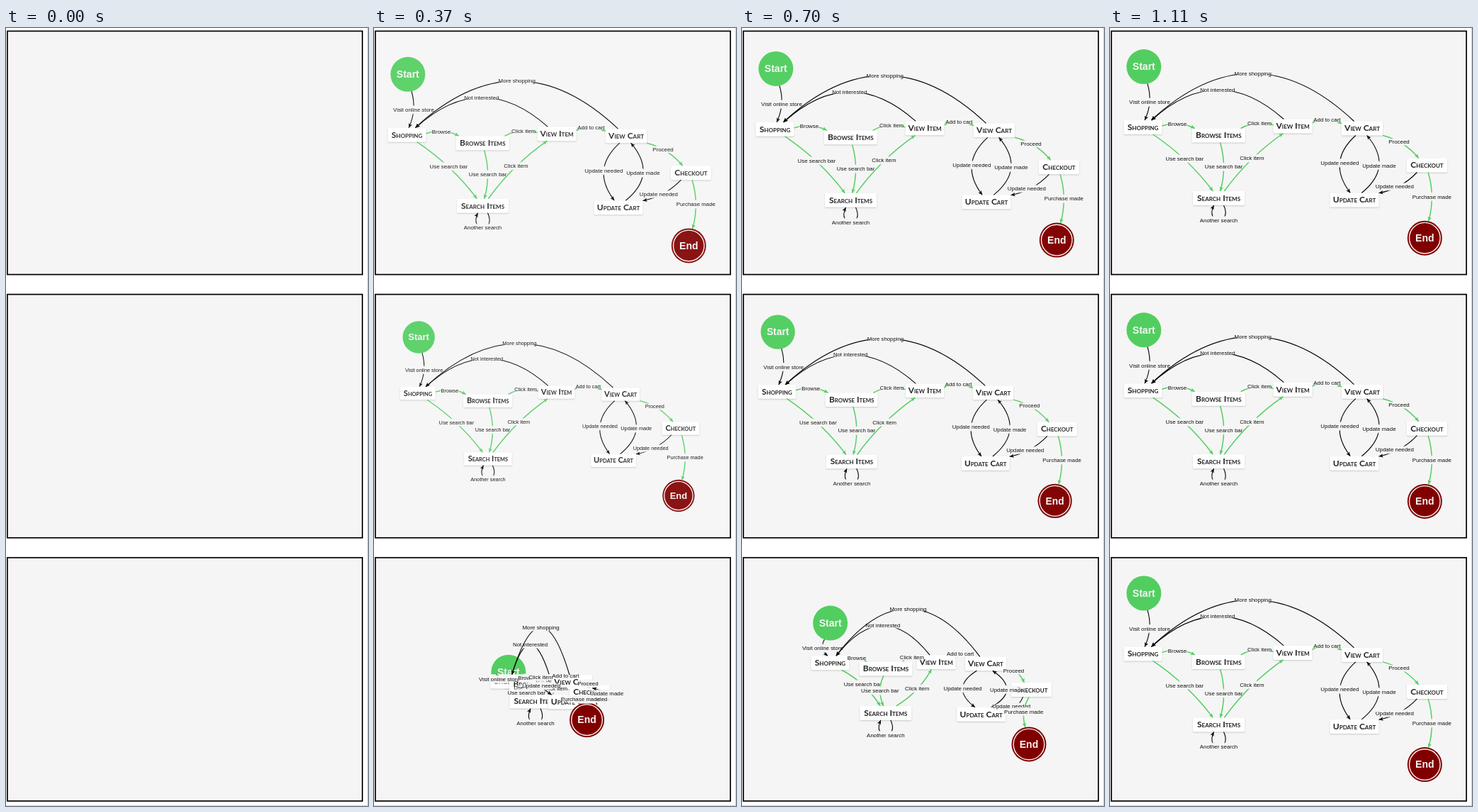
Animation of 511 by 1097 pixels, one loop 2.07 s. Source, as an HTML page with a canvas:

```html
<!DOCTYPE html>
<html lang="en">
<head>
<meta charset="utf-8">
<title>Flow chart entrances</title>
<style>
  html, body { margin: 0; width: 100%; height: 100%; overflow: hidden; background: #fff; }
  canvas { display: block; width: 511px; height: 1097px; }
</style>
</head>
<body>
<canvas id="stage"></canvas>
<script>
const W = 511, H = 1097, LOOP = 2070, START = 70;
const GREEN = '#52ce60', MAROON = '#800000', BACK = '#f5f5f5', INK = '#000';
const SANS = '"Liberation Sans", Arial, sans-serif';
const CAPS = 'small-caps bold 12px Lato, sans-serif';
const R = 24.5, STEP = 371.2, SETTLE = 1.1;

const canvas = document.getElementById('stage');
const ctx = canvas.getContext('2d');
const dpr = window.devicePixelRatio || 1;
canvas.width = W * dpr;
canvas.height = H * dpr;

// name: [text, centre x, centre y, half width, half height]
const nodes = {
  start: ['Start', 47.8, 54.6, R, R],
  shop: ['Shopping', 46.5, 140, 27, 10],
  browse: ['Browse Items', 153.3, 151.5, 37.5, 10],
  search: ['Search Items', 153.5, 240, 36.5, 10],
  item: ['View Item', 258, 138.5, 27.5, 10],
  cart: ['View Cart', 356, 141.5, 29, 10],
  update: ['Update Cart', 345, 242.5, 34.5, 10],
  check: ['Checkout', 447.5, 193.5, 28.5, 10],
  end: ['End', 444.3, 296.2, R, R]
};

// from, to, text, colour, bend, label shift x, y, bend factor while unfolding
const links = [
  ['start', 'shop', 'Visit online store', INK, 6.6, 0, 0, -1],
  ['shop', 'browse', 'Browse', GREEN, 6.6, -2, 1],
  ['shop', 'search', 'Use search bar', GREEN, 6.6, -1, -2],
  ['browse', 'search', 'Use search bar', GREEN, 6.6, 0, 0, -1],
  ['search', 'item', 'Click item', GREEN, 6.6, 1, -2, -1],
  ['search', 'search', 'Another search', INK, 0],
  ['browse', 'item', 'Click item', GREEN, 6.6, 4, 0],
  ['item', 'shop', 'Not interested', INK, -56],
  ['item', 'cart', 'Add to cart', GREEN, 6.6],
  ['cart', 'shop', 'More shopping', INK, -89],
  ['cart', 'update', 'Update needed', INK, -25],
  ['update', 'cart', 'Update made', INK, -28],
  ['cart', 'check', 'Proceed', GREEN, 6.6, -5, -3],
  ['check', 'update', 'Update needed', INK, 6.6, -7, 1],
  ['check', 'end', 'Purchase made', GREEN, 6.6, 0, 0, -1]
];

// elapsed ms -> animation progress
const clock = [[70, .035], [250, .236], [370, .373], [630, .543], [800, .721], [930, .839], [1110, 1]];
// progress -> place of the start circle while the chart unfolds and recentres
const anchor = [[0, 245, 206], [.236, 228, 194], [.373, 190, 166], [.543, 148, 113],
                [.721, 92, 74], [.839, 70, 62], [1, 59, 56]];

function lookup(table, x, col = 1) {
  if (x <= table[0][0]) return table[0][col];
  for (let i = 1; i < table.length; i++) {
    const a = table[i - 1], b = table[i];
    if (x <= b[0]) return a[col] + (b[col] - a[col]) * (x - a[0]) / (b[0] - a[0]);
  }
  return table[table.length - 1][col];
}

const outExpo = t => t >= 1 ? 1 : 1 - 2 ** (-10 * t);
const inOutQuad = t => t < .5 ? 2 * t * t : 1 - 2 * (1 - t) ** 2;

function restLayout() {
  const out = {};
  for (const id in nodes) {
    const [text, x, y, hw, hh] = nodes[id];
    out[id] = { text, x, y, hw, hh };
  }
  return out;
}

// All top left corners begin on one point and spread apart.
function unfoldLayout(t) {
  const p = inOutQuad(t), out = restLayout(), s = nodes.start;
  const ax = lookup(anchor, t, 1) - R, ay = lookup(anchor, t, 2) - R;
  for (const n of Object.values(out)) {
    n.x = ax + n.hw + p * (n.x - n.hw - s[1] + R);
    n.y = ay + n.hh + p * (n.y - n.hh - s[2] + R);
  }
  return out;
}

function disc(x, y, r) {
  ctx.beginPath();
  ctx.arc(x, y, r, 0, 7);
}

function drawRound(n, fill, ring) {
  ctx.fillStyle = fill;
  disc(n.x, n.y, R);
  ctx.fill();
  if (ring) {
    ctx.strokeStyle = BACK;
    ctx.lineWidth = 1.4;
    disc(n.x, n.y, 21.8);
    ctx.stroke();
  }
  ctx.fillStyle = BACK;
  ctx.font = `bold 14px ${SANS}`;
  ctx.textAlign = 'center';
  ctx.fillText(n.text, n.x, n.y + 4.8);
}

function drawBox(n) {
  ctx.save();
  ctx.shadowColor = '#c8c8c8';
  ctx.shadowBlur = 2 * dpr;
  ctx.shadowOffsetY = dpr;
  ctx.fillStyle = '#fff';
  ctx.beginPath();
  ctx.roundRect(n.x - n.hw, n.y - n.hh, n.hw * 2, n.hh * 2, 1.3);
  ctx.fill();
  ctx.restore();
  ctx.fillStyle = 'rgba(0,0,0,.87)';
  ctx.font = CAPS;
  ctx.textAlign = 'center';
  ctx.fillText(n.text, n.x, n.y + 3.8);
}

// Point on a node's outline in the direction of (x, y)
function edge(n, [x, y]) {
  const dx = x - n.x, dy = y - n.y;
  const s = n.hh === R
    ? R / (Math.hypot(dx, dy) || 1)
    : Math.min(n.hw / (Math.abs(dx) || 1e-6), n.hh / (Math.abs(dy) || 1e-6));
  return [n.x + dx * s, n.y + dy * s];
}

function controls([ax, ay], [bx, by], bend) {
  const dx = bx - ax, dy = by - ay, len = Math.hypot(dx, dy) || 1;
  const nx = dy / len * bend, ny = -dx / len * bend;
  return [[ax + dx / 3 + nx, ay + dy / 3 + ny], [ax + dx * 2 / 3 + nx, ay + dy * 2 / 3 + ny]];
}

function route(a, b, bend) {
  if (a === b) {
    const y = a.y + a.hh;
    return [[a.x + 7, y], [a.x + 20, y + 28], [a.x - 20, y + 28], [a.x - 7, y]];
  }
  const aim = controls([a.x, a.y], [b.x, b.y], bend);
  const p = edge(a, aim[0]), q = edge(b, aim[1]);
  return [p, ...controls(p, q, bend), q];
}

function drawArrow([x, y], [fx, fy]) {
  ctx.save();
  ctx.translate(x, y);
  ctx.rotate(Math.atan2(y - fy, x - fx));
  ctx.beginPath();
  ctx.moveTo(0, 0);
  ctx.lineTo(-6, -2.7);
  ctx.lineTo(-4.6, 0);
  ctx.lineTo(-6, 2.7);
  ctx.fill();
  ctx.restore();
}

function drawLabel(text, x, y) {
  ctx.font = `7.9px ${SANS}`;
  ctx.textAlign = 'center';
  const glow = ctx.createRadialGradient(0, 0, 0, 0, 0, 1);
  glow.addColorStop(0, BACK);
  glow.addColorStop(.7, BACK);
  glow.addColorStop(1, 'rgba(245,245,245,0)');
  ctx.save();
  ctx.translate(x, y);
  ctx.scale(ctx.measureText(text).width / 2 + 2.6, 7);
  ctx.fillStyle = glow;
  ctx.fillRect(-1, -1, 2, 2);
  ctx.restore();
  ctx.fillStyle = '#111';
  ctx.fillText(text, x, y + 2.7);
}

function drawLink(a, b, text, color, bend, sx = 0, sy = 0) {
  const [p, c, d, q] = route(a, b, bend);
  ctx.strokeStyle = ctx.fillStyle = color;
  ctx.lineWidth = color === GREEN ? 1.5 : 1.1;
  ctx.beginPath();
  ctx.moveTo(...p);
  ctx.bezierCurveTo(...c, ...d, ...q);
  ctx.stroke();
  drawArrow(q, d);
  const mid = i => (p[i] + 3 * c[i] + 3 * d[i] + q[i]) / 8;
  drawLabel(text, mid(0) + sx, mid(1) + sy);
}

function drawChart(layout, unfolding = false) {
  for (const id in layout) {
    if (id === 'start') drawRound(layout[id], GREEN);
    else if (id === 'end') drawRound(layout[id], MAROON, true);
    else drawBox(layout[id]);
  }
  for (const [from, to, text, color, bend, sx, sy, sway = 1] of links) {
    drawLink(layout[from], layout[to], text, color, unfolding ? bend * sway : bend, sx, sy);
  }
}

function panel(index, veil, paint) {
  ctx.save();
  ctx.translate(0, index * STEP);
  ctx.beginPath();
  ctx.rect(1.9, 4.4, 501.2, 343.2);
  ctx.fillStyle = BACK;
  ctx.fill();
  ctx.save();
  ctx.clip();
  if (paint) {
    ctx.save();
    paint();
    ctx.restore();
    ctx.fillStyle = `rgba(245,245,245,${veil})`;
    ctx.fillRect(0, 0, W, 350);
  }
  ctx.restore();
  ctx.strokeStyle = '#000';
  ctx.lineWidth = 1.7;
  ctx.strokeRect(1.9, 4.4, 501.2, 343.2);
  ctx.restore();
}

function draw(ms) {
  const live = ms >= START, t = lookup(clock, ms), p = outExpo(t);
  const moving = t < 1, drop = moving ? SETTLE : 0;
  ctx.setTransform(dpr, 0, 0, dpr, 0, 0);
  ctx.fillStyle = '#fff';
  ctx.fillRect(0, 0, W, H);
  ctx.fillStyle = '#d0d0d0';
  ctx.fillRect(510, 0, 1, H);
  ctx.fillRect(0, 1096, W, 1);

  panel(0, 1 - p, live && (() => {
    ctx.translate(0, 128 * (1 - p) + drop);
    drawChart(restLayout());
  }));
  panel(1, 1 - p, live && (() => {
    ctx.translate(252, 176 + drop);
    ctx.scale(p, p);
    ctx.translate(-252, -176);
    drawChart(restLayout());
  }));
  panel(2, 0, live && (() => drawChart(moving ? unfoldLayout(t) : restLayout(), moving)));
}

const began = performance.now();
function tick() {
  draw((performance.now() - began) % LOOP);
  requestAnimationFrame(tick);
}
tick();
</script>
</body>
</html>
```
